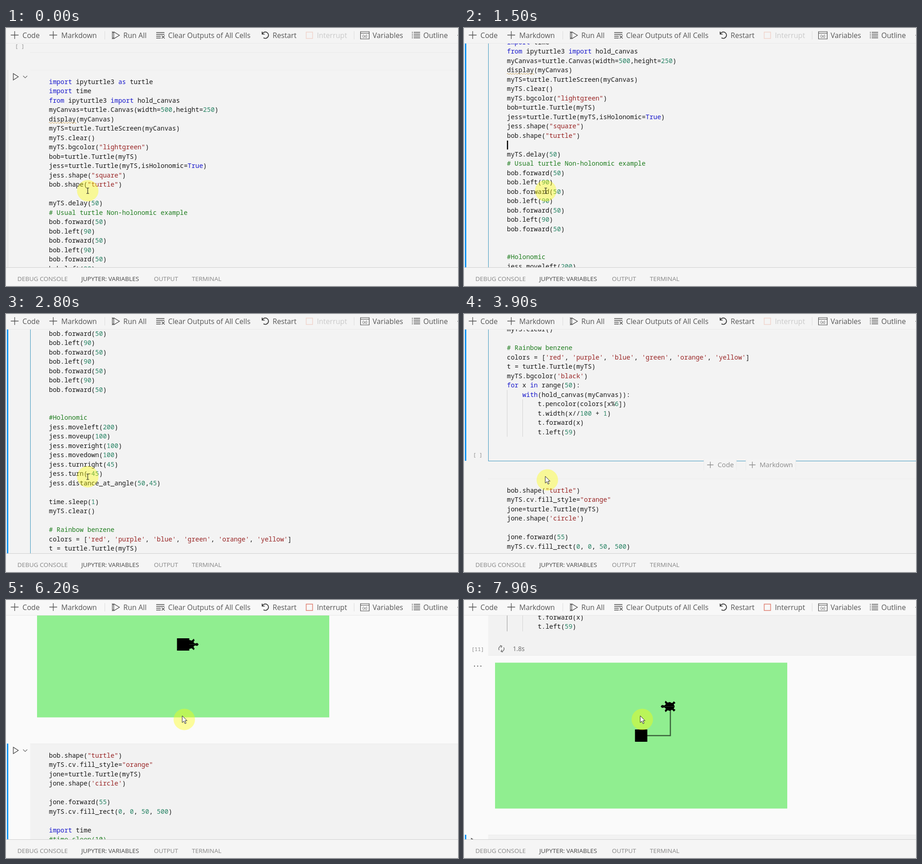
These frames come from a looping animation (990x566 px, 8 s). An HTML page with a canvas:

```html
<!DOCTYPE html>
<html lang="en">
<head>
<meta charset="utf-8">
<title>Notebook</title>
<style>
html, body { margin: 0; width: 100%; height: 100%; overflow: hidden; background: #f3f3f3; }
canvas { display: block; }
</style>
</head>
<body>
<canvas id="stage" width="990" height="566"></canvas>
<script>
const c = document.getElementById('stage').getContext('2d');
const LOOP = 8000, LINE = 20.5, CHAR = 8.44, LEFT = 94;
const MONO = '"Noto Sans Mono", monospace', SANS = '"Open Sans", "Noto Sans", sans-serif';
const INK = '#4a4a4a', BLUE = '#0090f1';

const square = 'bob.forward(50)\nbob.left(90)\n'.repeat(3) + 'bob.forward(50)';
const mainCode = `import ipyturtle3 as turtle
import time
from ipyturtle3 import hold_canvas
myCanvas=turtle.Canvas(width=500,height=250)
display(myCanvas)
myTS=turtle.TurtleScreen(myCanvas)
myTS.clear()
myTS.bgcolor("lightgreen")
bob=turtle.Turtle(myTS)
jess=turtle.Turtle(myTS,isHolonomic=True)
jess.shape("square")
bob.shape("turtle")

myTS.delay(50)
# Usual turtle Non-holonomic example
${square}


#Holonomic
jess.moveleft(200)
jess.moveup(100)
jess.moveright(100)
jess.movedown(100)
jess.turnright(45)
jess.turn(-45)
jess.distance_at_angle(50,45)

time.sleep(1)
myTS.clear()

# Rainbow benzene
colors = ['red', 'purple', 'blue', 'green', 'orange', 'yellow']
t = turtle.Turtle(myTS)
myTS.bgcolor('black')
for x in range(50):
    with(hold_canvas(myCanvas)):
        t.pencolor(colors[x%6])
        t.width(x//100 + 1)
        t.forward(x)
        t.left(59)`.split('\n');
const nextCode = `bob.shape("turtle")
myTS.cv.fill_style="orange"
jone=turtle.Turtle(myTS)
jone.shape('circle')

jone.forward(55)
myTS.cv.fill_rect(0, 0, 50, 500)

import time
#time.sleep(10)`.split('\n');

// Document positions of the first cell
const TOP = 92, BOTTOM = 1103.5, FIRST = 118;

const scrollKeys = [[0, 0], [800, 0], [1500, 107.5], [2800, 382.5], [2900, 396], [3000, 396],
  [3900, 781.5], [4200, 781.5], [4800, 676], [6000, 676], [6100, 1182], [6700, 1182], [7200, 982], [8000, 982]];
const mouseX = [[0, 179], [4000, 179], [4500, 387], [8000, 387]];
const mouseY = [[0, 357], [4000, 357], [4500, 255], [8000, 255]];
const headX = [[0, 0], [6100, 0], [6600, 50], [8000, 50]];
const headY = [[0, 0], [7000, 0], [7500, 50], [8000, 50]];
const headTurn = [[0, 0], [6600, 0], [7000, 90], [7500, 90], [7900, 180], [8000, 180]];

function at(keys, t) {
  const i = keys.findIndex(k => k[0] > t);
  const [t0, a] = keys[i - 1], [t1, b] = keys[i];
  return a + (b - a) * (t - t0) / (t1 - t0);
}

function rect(x, y, w, h, color) {
  c.fillStyle = color;
  c.fillRect(x, y, w, h);
}

function text(s, x, y, size, color, font = SANS, align = 'left') {
  c.font = `${size}px ${font}`;
  c.textAlign = align;
  c.fillStyle = color;
  c.fillText(s, x, Math.round(y));
}

function path(d, color, width = 1.3, fill) {
  const p = new Path2D(d);
  if (fill) { c.fillStyle = fill; c.fill(p); }
  c.strokeStyle = color;
  c.lineWidth = width;
  c.stroke(p);
}

function plus(x, y, r, color) {
  path(`M${x - r} ${y}h${2 * r}M${x} ${y - r}v${2 * r}`, color);
}

const token = /(#.*)|("[^"]*"|'[^']*')|\b(import|from|as|for|in|with|True)\b|\b(\d+)\b|[^\s"'#\w]+|\w+/g;
const palette = ['#1f7d1f', '#982323', '#1818cc', '#2a8566'];

function code(lines, first) {
  lines.forEach((line, i) => {
    const y = first + i * LINE;
    if (y < 15 || y > 545) return;
    for (const m of line.matchAll(token)) {
      const kind = m.slice(1).findIndex(Boolean);
      text(m[0], LEFT + m.index * CHAR, y + 4.9, 14.07, palette[kind] || '#181818', MONO);
    }
  });
}

function runButton(y) {
  path(`M16 ${y - 7}v14l11 -7z`, '#444');
  path(`M37.5 ${y - 2}l4.5 4.5l4.5 -4.5`, '#666', 1.1);
}

function caret(line, x, scroll) {
  rect(x, FIRST + line * LINE - scroll - 9.5, 2.5, 19.5, '#000');
}

function output(t, top) {
  const cx = 388, cy = top + 160, k = 1.28;
  const x = cx + at(headX, t) * k, y = cy - at(headY, t) * k;
  rect(68, top, 640, 320, '#90ee90');
  path(`M${cx} ${cy}H${x}V${y}`, 'rgba(0,0,0,.6)', 2.5);
  c.save();
  c.translate(x, y);
  c.rotate(-at(headTurn, t) * Math.PI / 180);
  c.scale(k, k);
  const half = 'L14 -2L10 -1L7 -4L9 -7L8 -9L5 -6L1 -7L-3 -5L-6 -8L-8 -6L-5 -4L-7 0';
  path('M16 0' + half, '#000', 1, '#000');
  c.scale(1, -1);
  path('M16 0' + half, '#000', 1, '#000');
  c.restore();
  rect(cx - 13.5, cy - 13.5, 27, 27, '#000');
}

function insertButtons(y) {
  for (const [x, w, label] of [[525, 72, 'Code'], [617, 110, 'Markdown']]) {
    rect(x, y - 12, w, 24, '#ebebeb');
    rect(x + 1, y - 12, w - 2, 24, '#f4f4f4');
    plus(x + 14.5, y, 7, '#8c8c8c');
    text(label, x + 30.5, y + 5, 14.7, '#8c8c8c');
  }
}

function notebook(t, scroll, mx, my) {
  const running = t >= 6000, shown = t >= 6100, editing = t >= 400 && !running;
  const top = Math.floor(TOP - scroll), bottom = Math.floor(BOTTOM - scroll), first = FIRST - scroll;
  const next = Math.floor((shown ? 1497 : 1142.5) - scroll);
  const faint = running ? '#ebebeb' : '#eeeeee';

  if (running) {
    rect(53, top, 937, bottom - top, '#f2f2f2');
    rect(53, next, 937, 560, '#f2f2f2');
  }
  rect(53, 53 - scroll, 937, 1, '#e9e9e9');
  rect(53, next, 937, 1, faint);
  text('[ ]', 30, 44 - scroll, 11.5, '#8a8a8a', MONO, 'center');

  if (editing) {
    rect(2, top, 3, bottom - top, BLUE);
    c.strokeStyle = '#3d97bf';
    c.lineWidth = 1;
    c.strokeRect(53.5, top + .5, 950, bottom - top);
  } else {
    rect(53, top, 937, 1, faint);
    rect(53, bottom, 937, 1, faint);
    if (running) rect(2, next, 3, 560, BLUE);
    else rect(3, top, 2, bottom - top, '#e6e6e6');
  }
  runButton(running ? next + 15 : top + 15);

  const guide = (x, line, color) => rect(x, first + (line - .5) * LINE, 1, (46 - line) * LINE, color);
  guide(94, 41, t >= 5000 ? '#999' : '#d3d3d3');
  guide(128, 42, '#d3d3d3');
  code(mainCode, first);
  code(nextCode, (shown ? 1523 : 1168.5) - scroll);
  path(`M94 ${first + 4 * LINE + 8}` + 'q1.5 -3 3 0t3 0'.repeat(10), '#c8953a', 1);

  if (editing) {
    if (t < 5000) {
      if (Math.floor((t - 400) / 500) % 2 === 0) caret(12, LEFT, scroll);
    } else if (t < 5700) caret(40, LEFT + 19 * CHAR - 1, scroll);
  }

  const status = bottom - 14;
  text(running ? '[11]' : '[ ]', 30, status + 4.5, 11.5, '#8a8a8a', MONO, 'center');
  if (running) {
    path(`M77 ${status + 3}a6 6 0 0 1 6 -9M79 ${status - 7.5}l4 1.5l-2 4` +
         `M87 ${status - 3}a6 6 0 0 1 -6 9M85 ${status + 7.5}l-4 -1.5l2 -4`, '#666');
    text(Math.max(0, (t - 6100) / 1000).toFixed(1) + 's', 107, status + 5, 13.6, '#666');
  }
  if (shown) {
    for (const x of [22, 29, 36]) rect(x, bottom + 23, 2, 2, '#555');
    output(t, BOTTOM - scroll + 16);
  }

  const inCell = (my > top && my < bottom) || my > next;
  if (!running && !inCell && my > bottom) insertButtons(bottom + 9);
  pointer(mx, my, inCell);
}

function pointer(x, y, beam) {
  c.fillStyle = 'rgba(255,255,0,.38)';
  c.beginPath();
  c.arc(beam ? x : x + 3.5, beam ? y : y + 7, 23.5, 0, 7);
  c.fill();
  if (beam) path(`M${x - 3} ${y - 6}h6M${x} ${y - 6}v12M${x - 3} ${y + 6}h6`, '#222', 1.2);
  else path(`M${x - 1} ${y - 1}v15l3.5 -3.3l2.6 5.6l2.4 -1.1l-2.6 -5.4h4.6z`, '#222', 1, '#fff');
}

function toolbar(t) {
  const active = t >= 6000;
  const label = (s, x, color = '#565656') => text(s, x, 22, 15.7, color);
  rect(0, 0, 990, 33, active ? '#f8f8f8' : '#f4f4f4');
  rect(0, 33, 990, 1, '#e8e8e8');
  rect(216, 7, 1, 18, '#dcdcdc');
  rect(762, 7, 1, 18, '#dcdcdc');
  plus(19, 15.5, 8.5, INK);
  label('Code', 36);
  plus(103.5, 15.5, 8.5, INK);
  label('Markdown', 121);
  path('M236 8.5v15l12.5 -7.5zM236 11l-3 -2.5v15l3 -2.5', INK);
  label('Run All', 257);
  path('M329 10h18M329 14h18M329 18h10M329 22h10M341 16.5l6.5 6.5M347.5 16.5l-6.5 6.5', INK);
  label('Clear Outputs of All Cells', 355);
  path('M561 8v5.5h5.5M561.5 13a7 7 0 1 1 2.5 8.5', '#333', 1.7);
  label('Restart', 584);
  path('M657.5 9h14v14h-14z', active ? '#de7f70' : '#f0d3cb', 1.5);
  label('Interrupt', 681, active ? '#565656' : '#cacaca');
  path('M776.5 8h19v16h-19zM776.5 11.5h19', INK, 1.2);
  text('(x)', 786, 21, 9, INK, SANS, 'center');
  label('Variables', 803);
  path('M889 9.5h2M893 9.5h14M889 13.5h2M893 13.5h14M889 17.5h2M893 17.5h14M889 21.5h2M893 21.5h14', INK);
  label('Outline', 914);
  rect(989, 15, 1, 2, '#777');
}

function panel() {
  rect(0, 525, 990, 41, '#f5f5f5');
  rect(0, 525, 990, 1, '#cfcfcf');
  const tabs = [['DEBUG CONSOLE', 25], ['JUPYTER: VARIABLES', 165], ['OUTPUT', 324], ['TERMINAL', 407]];
  tabs.forEach(([s, x], i) => text(s, x, 554.5, 13.45, i === 1 ? '#454545' : '#858585'));
}

function draw(now) {
  const t = Math.floor(now % LOOP / 100) * 100;
  rect(0, 0, 990, 566, t < 6000 ? '#f3f3f3' : '#fafafa');
  notebook(t, at(scrollKeys, t), at(mouseX, t), at(mouseY, t));
  toolbar(t);
  panel();
  requestAnimationFrame(draw);
}
requestAnimationFrame(draw);
</script>
</body>
</html>
```
